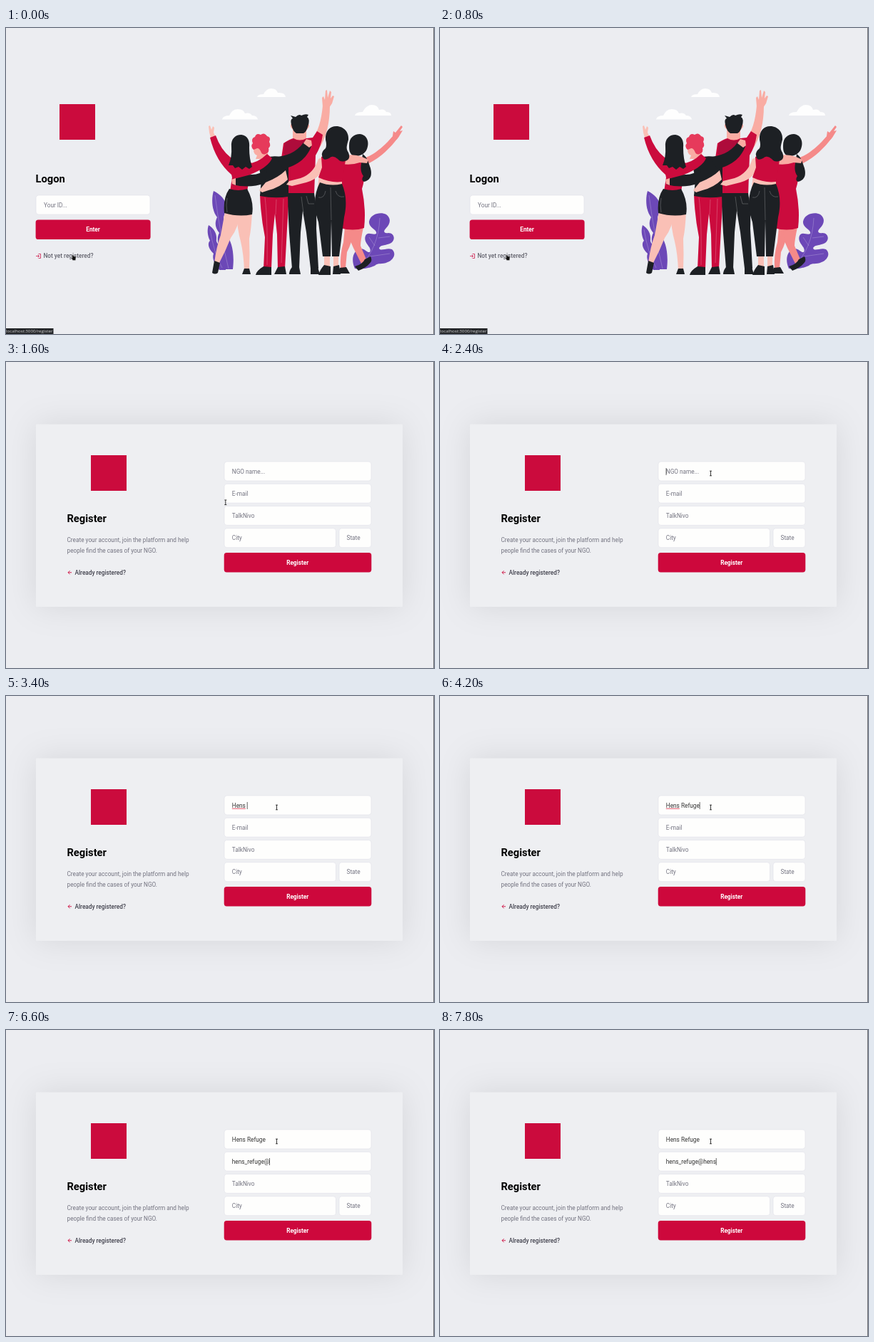
An HTML page that plays this animation: 600x430 px, repeating every 8 s.

```html
<!DOCTYPE html>
<html lang="en">
<head>
<meta charset="utf-8">
<title>Logon and register</title>
<style>
  html, body { margin: 0; width: 100%; height: 100%; overflow: hidden; background: #ecedf1; }
  svg { display: block; width: 600px; height: 430px; font: 8.26px Roboto, sans-serif; }
  text { fill: #737380; white-space: pre; }
  .title { font-size: 14.7px; font-weight: 700; fill: #000; }
  .link { font-weight: 500; fill: #41414d; }
  .field { fill: #fefefd; stroke: #dfdfe8; stroke-width: .6; }
  .button { fill: #cd083c; }
  .label { font-weight: 700; fill: #fff; text-anchor: middle; }
  .icon { fill: none; stroke: #cd083c; stroke-width: .9; }
  .typed { fill: #333; }
  .panel { fill: #eeeff2; filter: drop-shadow(0 0 23px #00000018); }
  .art path { fill: currentColor; }
  .art .limb { fill: none; stroke: currentColor; stroke-linecap: round; stroke-linejoin: round; }
  .art .seam { fill: none; stroke: #ffffff70; stroke-width: .5; }
  .ink { color: #1d2024; }
  .red { color: #cb0b3d; }
  .wine { color: #ae0c3b; }
  .coral { color: #e63a5b; }
  .skin { color: #f9aca3; }
  .pale { color: #fac0b6; }
  .rose { color: #f58a89; }
  .leaf { color: #6c48b7; }
  .cloud { color: #fefefe; }
</style>
</head>
<body>
<svg viewBox="0 0 600 430">
  <rect width="600" height="430" fill="#ecedf1"/>

  <g id="logon">
    <rect x="75" y="107" width="50" height="50" fill="#cb0b3d"/>
    <text class="title" x="41.5" y="216.7">Logon</text>
    <rect class="field" x="42" y="235" width="160" height="27" rx="3.7"/>
    <text x="53" y="251.5">Your ID...</text>
    <rect class="button" x="41.6" y="269.4" width="161" height="27.7" rx="3.7"/>
    <text class="label" x="122" y="286.2">Enter</text>
    <path class="icon" opacity=".8" d="M45.5 317.5H48.5V323.5H45.5M42 320.5H46.5M44.7 318.7L46.5 320.5L44.7 322.3"/>
    <text class="link" x="52.5" y="323.3" opacity=".8">Not yet registered?</text>

    <g class="art">
      <g class="cloud">
        <path d="M303 128.5Q304 123 313 123Q317 114 325 114Q333 114 335 120Q342 118 345 123Q352 123 353 128.5Z"/>
        <path d="M352 97Q353 93 361 93Q365 85 372 85Q379 85 381 91Q391 90 392 97Z"/>
        <path d="M489 123Q490 118 500 118Q505 108 513 108Q521 108 523 115Q531 113 533 118Q540 118 540 123Z"/>
      </g>
      <g class="leaf">
        <path d="M291 229C300 233 309 242 309 252C309 260 303 264 306 270C313 277 311 285 310 292C315 299 321 313 318 339H305C300 329 301 319 302 310C295 303 296 293 299 288C292 280 293 272 296 266C288 256 288 239 291 229Z"/>
        <path d="M284 277C291 281 296 289 295 297C294 302 299 304 301 309C307 318 307 329 308 340H299C294 333 288 325 291 317C282 309 283 301 286 299C282 291 282 283 284 277Z"/>
        <path d="M489 338C483 325 487 312 497 310C503 310 506 316 510 315C514 308 500 302 504 292C507 285 515 292 519 289C521 283 508 281 509 272C511 261 525 258 533 262C541 268 538 276 533 281C528 286 530 289 536 288C545 288 546 298 540 302C533 306 526 304 523 309C524 315 534 308 541 311C548 317 543 326 535 329C527 333 522 329 517 334Q504 340 489 338Z"/>
        <path class="seam" d="M293 235Q300 290 312 338M286 283Q291 315 303 337M496 335Q522 310 524 267M517 306L509 294M522 295L538 293M510 321L538 317"/>
      </g>

      <g id="woman-in-dress">
        <g class="rose">
          <path d="M497 184C510 182 523 172 535 160L543 151L549 155C538 169 525 183 503 193Z"/>
          <path d="M542 152L543 145L546 147L554 137L556 139L552 145L556 144L550 154L547 157Z"/>
          <path d="M475 280H489Q485 302 478 315L476 337H469Q468 318 473 301Z"/>
          <path d="M482 280H501Q497 299 497 306L505 325L498 331L487 309Q480 296 482 280Z"/>
        </g>
        <path class="red" d="M474 190Q490 183 502 189Q505 207 499 226Q505 255 502 281Q487 286 468 281V225Z"/>
        <g class="ink">
          <path d="M489 335Q500 332 503 325L511 321Q513 324 512 328Q507 336 494 341ZM468 337L477 336L482 345H467Z"/>
          <path d="M481 165C481 154 488 149 496 149C506 150 510 160 506 170C503 178 494 181 487 180C481 176 481 171 481 165Z"/>
          <path d="M500 177C508 183 508 190 511 197Q515 213 502 216Q497 214 501 208Q496 202 498 190Z"/>
        </g>
      </g>

      <g id="tall-man">
        <g class="skin">
          <path d="M428 157C438 146 442 130 444 109L454 109C454 134 449 154 438 171Z"/>
          <path d="M444 111L443 98L445 96L447 101L448 88L450 87L451 98L454 88L456 90L455 99L458 95L460 96L457 106L453 112Z"/>
          <path d="M402 132H421V156Q412 162 402 157ZM402 135Q398 134 399 139L403 144ZM421 135Q426 134 425 139L420 145Z"/>
        </g>
        <path class="red" d="M389 162Q398 156 403 155Q412 160 421 155L430 154L436 145L444 150Q442 166 434 179L432 235H393L386 183Z"/>
        <path class="wine" d="M391 161L403 156Q412 161 421 156L424 158L417 172L395 182L389 176Z"/>
        <g class="ink">
          <path d="M400 136Q398 128 402 127L399 123L406 125Q411 120 414 123Q420 120 424 122L422 125Q427 128 423 139Q421 146 417 148H407Q402 145 400 136Z"/>
          <path d="M394 232H432Q436 252 435 282L438 338H427L421 287L416 257L413 287L411 338H401L397 288Z"/>
          <path d="M401 336H411L413 346H397Q397 341 401 336ZM427 336H437L440 346H427Z"/>
        </g>
        <path class="seam" d="M414 237L417 260M421 236L424 247L432 247"/>
      </g>

      <g id="curly-friend">
        <path class="skin" d="M347 165H366L368 184H350L352 179Q347 178 347 170Z"/>
        <path class="coral" d="M347 171Q342 166 346 162Q343 155 349 153Q351 147 357 150Q362 146 366 152Q372 153 369 160Q372 165 368 169Q370 174 364 177Q359 179 357 173Q354 167 350 170Z"/>
        <path class="red" d="M356 234H395Q396 260 394 282L391 338H381L380 290L377 261L374 290L372 338H361L363 294Q357 264 356 234Z"/>
        <g class="ink">
          <path d="M353 188Q368 178 384 181L396 194L396 237Q376 240 356 236L358 212Z"/>
          <path d="M361 335L372 336V347H350Q351 341 361 335ZM381 336L391 335L393 346H376Z"/>
          <path d="M376 181C392 181 407 175 417 161L429 163C424 181 410 193 389 198Z"/>
        </g>
        <path class="skin" d="M417 162L421 156L428 158L429 165L425 168Z"/>
        <path class="seam" d="M379 241L378 262M363 238Q367 270 366 333M389 240L386 330"/>
      </g>

      <path class="pale" d="M392 200Q382 210 364 217L355 228L359 231L368 228Q384 224 395 213Z"/>

      <g id="woman-in-skirt">
        <g class="pale">
          <path d="M287 154L285 147L284 138L286 137L288 143L290 138L292 140L291 147L294 153Z"/>
          <path d="M307 258H328Q327 279 315 295Q308 313 299 330H292Q295 307 301 291Z"/>
          <path d="M323 258H345Q344 282 341 296Q342 318 341 340H334Q333 317 329 300Q324 282 323 258Z"/>
        </g>
        <g class="red">
          <path d="M286 154L294 151Q301 171 315 182L323 187L316 206Q294 187 286 154Z"/>
          <path d="M312 188Q328 181 345 190L341 211L338 230H314L317 210Z"/>
          <path d="M337 191Q353 190 366 177L373 183Q368 196 340 207Z"/>
        </g>
        <g class="ink">
          <path d="M316 167C315 156 321 150 330 150C339 151 342 159 341 168Q341 184 345 195L341 198L336 195L331 199L326 195L321 197L318 193L312 193Q317 181 316 167Z"/>
          <path d="M313 226Q326 230 338 226Q348 244 345 262Q326 266 306 260Q304 239 313 226Z"/>
          <path d="M366 197Q355 207 343 206L320 212L318 220Q341 226 363 218Z"/>
          <path d="M292 327L300 330L297 344Q293 347 289 344ZM334 338H341L343 346H331Z"/>
        </g>
        <path class="skin" d="M322 211L316 213L317 219L322 221Z"/>
        <path class="seam" d="M310 239Q308 249 310 259"/>
      </g>

      <g id="woman-in-trousers">
        <g class="pale">
          <path d="M438 184Q446 179 448 190Q441 212 421 217L401 222L393 220L397 215L413 211Q431 205 438 184Z"/>
          <path d="M439 205H471V224H437Z"/>
          <path d="M446 315H454V337H446ZM459 315H466V337H459Z"/>
        </g>
        <path class="skin" d="M470 180Q486 176 499 181L508 185L506 190L496 189Q485 193 470 191Z"/>
        <path class="red" d="M442 181Q458 177 476 186L471 216Q455 218 438 210L443 196Z"/>
        <g class="ink">
          <path d="M448 157C447 145 454 138 463 138C474 138 481 147 480 157C478 165 476 169 480 175Q484 185 475 187Q469 189 465 184Q458 178 453 183Q444 188 443 179Q442 174 448 169Q450 165 448 157Z"/>
          <path d="M440 217Q455 223 471 219Q480 240 474 266L467 321H457L456 270L455 321H444L438 273Q427 243 440 217Z"/>
          <path d="M446 333L455 335V347H438Q440 340 446 333ZM459 335L467 333L469 346H458Z"/>
        </g>
        <path class="seam" d="M455 224L456 270M438 238Q446 240 448 229M462 229Q465 239 474 237"/>
      </g>
    </g>
    <path d="M92.5 319.5Q94 318 94.7 320.5L98 321.5L97.5 326.5H93.5L91.5 322.5L93 323Z" fill="#111" stroke="#fff" stroke-width=".3"/>
  </g>

  <g id="register">
    <rect class="panel" x="42" y="87.5" width="514" height="256.5" rx="1"/>
    <rect x="119" y="131" width="50" height="50" fill="#cb0b3d"/>
    <text class="title" x="85.5" y="224.5">Register</text>
    <text x="85.5" y="253">Create your account, join the platform and help</text>
    <text x="85.5" y="267.5">people find the cases of your NGO.</text>
    <path class="icon" d="M92 295.8H87M89.5 293.3L87 295.8L89.5 298.3"/>
    <text class="link" x="96.5" y="298.5">Already registered?</text>
    <g class="field">
      <rect x="306" y="140" width="206" height="27" rx="3.7"/>
      <rect x="306" y="171.2" width="206" height="27" rx="3.7"/>
      <rect x="306" y="202.4" width="206" height="27" rx="3.7"/>
      <rect x="306" y="233.7" width="156.5" height="27" rx="3.7"/>
      <rect x="467" y="233.7" width="45" height="27" rx="3.7"/>
    </g>
    <text id="name" x="316.8" y="157"></text>
    <text id="email" x="316.8" y="188"></text>
    <text x="316.8" y="219">TalkNivo</text>
    <text x="316.8" y="250.3">City</text>
    <text x="477.5" y="250.3">State</text>
    <rect class="button" x="305.7" y="268" width="206.6" height="27.5" rx="3.7"/>
    <text class="label" x="408.7" y="284.7">Register</text>
    <path id="spelling" stroke="#e0304a" stroke-width=".8"/>
    <path id="caret" stroke="#222" stroke-width=".7"/>
    <path id="arrow" d="M0 0V7.5L1.7 6L3 8.5L4.2 8L3 5.5H5Z" fill="#111" stroke="#fff" stroke-width=".3"/>
    <path id="beam" d="M-1.5 -3.3H1.5M0 -3.3V3.3M-1.5 3.3H1.5" fill="none" stroke="#222" stroke-width=".9"/>
  </g>

  <g id="status">
    <rect y="422" width="66.5" height="8" fill="#25272a"/>
    <text x="0" y="428.3" style="font: 6.15px 'Open Sans', sans-serif; fill: #d5d5d5">localhost:3000/register</text>
  </g>
  <path d="M599.5 0V430" stroke="#77787c"/>
</svg>

<script>
const LOOP = 8000, STEP = 200;
const $ = id => document.getElementById(id);
const show = (id, visible) => $(id).style.display = visible ? '' : 'none';

// counts: number of characters present after each step since start.
const nameField = { id: 'name', hint: 'NGO name...', value: 'Hens Refuge', start: 2800,
  counts: [1, 2, 4, 5, 7, 8, 10, 11] };
const emailField = { id: 'email', hint: 'E-mail', value: 'hens_refuge@hens', start: 4800,
  counts: [1, 2, 4, 5, 6, 7, 9, 11, 11, 12, 12, 12, 13, 14, 14, 16] };

function fill({ id, hint, value, start, counts }, t) {
  const step = Math.min((t - start) / STEP, counts.length - 1);
  const typed = step < 0 ? '' : value.slice(0, counts[step]);
  $(id).textContent = typed || hint;
  $(id).setAttribute('class', typed ? 'typed' : '');
  return typed;
}

function draw(time) {
  const t = Math.floor(time % LOOP / STEP) * STEP;
  const registering = t >= 1000;
  show('logon', !registering);
  show('register', registering);
  show('status', t < 1200);
  if (!registering) return;

  const name = fill(nameField, t), email = fill(emailField, t);
  const onEmail = t >= 4400;
  const typed = onEmail ? email : name;
  const width = typed ? $(onEmail ? 'email' : 'name').getComputedTextLength() : 0;
  show('caret', t >= 2400);
  $('caret').setAttribute('d', `M${317.1 + width} ${onEmail ? 180 : 149}v10`);

  const misspelt = !onEmail && name.length > 4;
  show('spelling', misspelt);
  if (misspelt) $('spelling').setAttribute('d', `M316.8 158.3h${$('name').getSubStringLength(0, 4)}`);

  const left = 1 - Math.min((t - 1000) / 1200, 1);
  const ease = 1 - left * left;
  const x = 92.7 + 286.8 * ease, y = 319.5 - 163 * ease;
  const overField = x > 306;
  show('beam', overField);
  show('arrow', !overField);
  $(overField ? 'beam' : 'arrow').setAttribute('transform', `translate(${x} ${y})`);
}

const begin = performance.now();
function tick() {
  draw(performance.now() - begin);
  requestAnimationFrame(tick);
}
tick();
</script>
</body>
</html>
```
